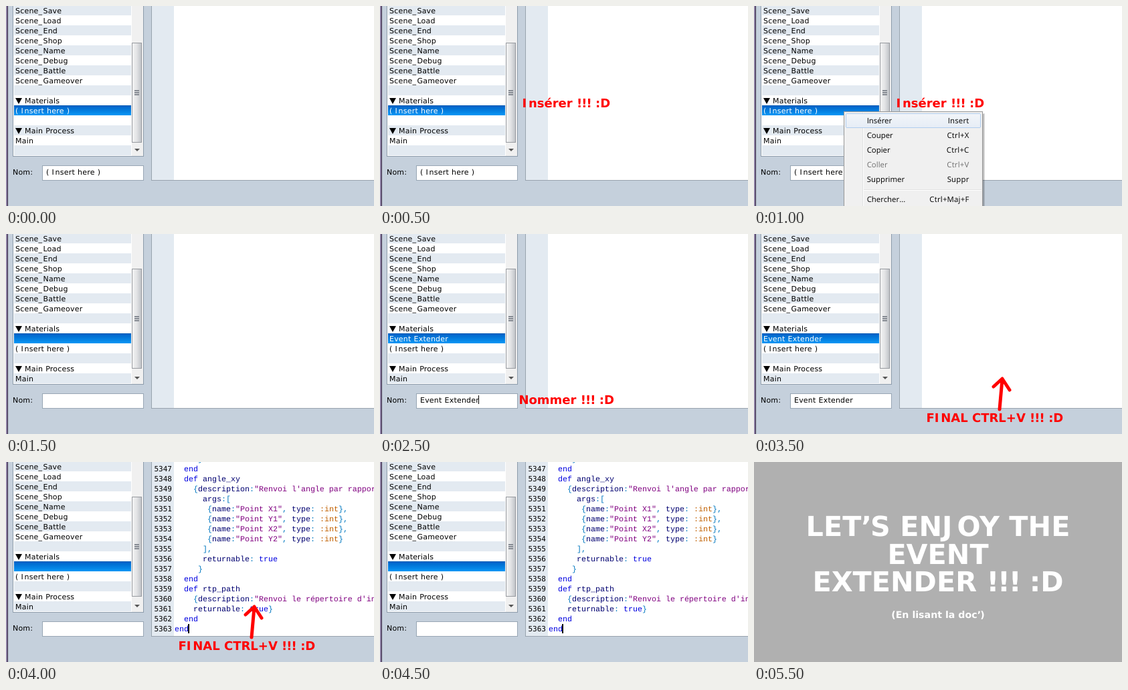
Write an HTML page that moves like this. It is 550 px wide and 300 px high and loops after 6.5 s.

```html
<!DOCTYPE html>
<html lang="fr">
<head>
<meta charset="utf-8">
<style>
  html, body { margin: 0; width: 100%; height: 100%; overflow: hidden; background: #c5d0dc; }
  svg { display: block; }
  rect { shape-rendering: crispEdges; }
  text { white-space: pre; text-rendering: geometricPrecision; font-kerning: none; }
  .ui { font: 11px "DejaVu Sans", sans-serif; letter-spacing: .2px; word-spacing: .4px; }
  .menu { font: 11.4px "Open Sans", sans-serif; }
  .key { text-anchor: end; letter-spacing: .2px; }
  .note { font: bold 18px "DejaVu Sans", sans-serif; fill: #f00; }
  .code { font: 11.667px "Liberation Mono", monospace; }
  .num { font: 11px "DejaVu Sans Mono", monospace; }
  .end { font: bold 41.33px "DejaVu Sans", sans-serif; fill: #fff; text-anchor: middle; }
</style>
</head>
<body>
<svg id="stage" width="550" height="300" viewBox="0 0 550 300"></svg>
<script>
const LOOP = 6500;
const CUTS = [0, 500, 1000, 1500, 2000, 2500, 3000, 3500, 4000, 4500, 5500];
const stage = document.getElementById('stage');

const rect = (x, y, w, h, fill, extra = '') =>
  `<rect x="${x}" y="${y}" width="${w}" height="${h}" fill="${fill}" ${extra}/>`;
const box = (x, y, w, h, fill, stroke, extra = '') =>
  rect(x + .5, y + .5, w - 1, h - 1, fill, `stroke="${stroke}" ${extra}`);
const text = (x, y, str, cls, extra = '') =>
  `<text x="${x}" y="${y}" class="${cls}" ${extra}>${str}</text>`;

// Extra tracking, in em, after the letters that need it
const TRACKING = { I: .16, J: .17, '!': -.054, '’': -.05, _: .13 };
const tracked = str => str.replace(/[IJ!’_]/g,
  c => `<tspan style="letter-spacing:${TRACKING[c]}em">${c}</tspan>`);
const label = (x, y, str, cls, extra) => text(x, y, tracked(str), cls, extra);

const DEFS = `<defs>
  <linearGradient id="sel" x2="0" y2="1"><stop stop-color="#0063c8"/><stop offset="1" stop-color="#0897f5"/></linearGradient>
  <linearGradient id="thumb"><stop stop-color="#f5f5f5"/><stop offset=".5" stop-color="#e2e3e5"/><stop offset="1" stop-color="#bfc2c7"/></linearGradient>
  <linearGradient id="hover" x2="0" y2="1"><stop stop-color="#f2f5f9"/><stop offset="1" stop-color="#e6edf6"/></linearGradient>
</defs>`;

function list(name, inserted) {
  const scenes = ['Save', 'Load', 'End', 'Shop', 'Name', 'Debug', 'Battle', 'Gameover'];
  const rows = [...scenes.map(s => 'Scene_' + s), '', '▼Materials', name,
    ...(inserted ? ['( Insert here )'] : []), '', '▼Main Process', 'Main'];
  let out = box(10, -2, 196, 228, '#fff', '#8d9cab');
  for (let i = 0; i < 15; i++) {
    const y = i * 15, row = rows[i] || '', selected = i === 10;
    if (selected) out += rect(12, y - 1, 175, 15, '#0058b4') + rect(12, y, 175, 14, 'url(#sel)');
    else if (i % 2 === 0) out += rect(12, y - 1, 175, 15, '#e3eaf1');
    if (row[0] === '▼') {
      out += `<polygon points="14,${y + 3} 24,${y + 3} 19,${y + 12}"/>` + label(28, y + 11, row.slice(1), 'ui');
    } else {
      out += label(14, y + 11, row, 'ui', selected ? 'fill="#fff"' : '');
    }
  }
  const top = inserted ? 52 : 55;
  out += rect(188, 0, 17, 225, '#f0f0f0') +
    box(188, top, 15, 150, 'url(#thumb)', '#979a9f', 'rx="1"') +
    '<polygon points="192,214 200,214 196,218" fill="#555"/>';
  for (let i = 0; i < 3; i++) out += rect(192, top + 71 + i * 3, 7, 2, '#858a92');
  return out;
}

const CODE = `     }
  end
  def angle_xy
    {description:"Renvoi l'angle par rapport à deux points",
      args:[
       {name:"Point X1", type: :int},
       {name:"Point Y1", type: :int},
       {name:"Point X2", type: :int},
       {name:"Point Y2", type: :int}
      ],
      returnable: true
     }
  end
  def rtp_path
    {description:"Renvoi le répertoire d'installation",
    returnable: true}
  end
end`.split('\n');

function tokenColor(token) {
  if (token[0] === '"') return '#800080';
  if (/^:\w/.test(token)) return '#c06000';
  if (/^(def|end|true)$/.test(token)) return '#0000e0';
  return /^\w/.test(token) ? '#000070' : '#0078c0';
}

const highlight = line => line.replace(/"[^"]*"|:\w+|\w+|[^\w\s]/g,
  token => `<tspan fill="${tokenColor(token)}">${token}</tspan>`);

const code = () => CODE.map((line, i) =>
  text(221.5, i * 15 - 1, 5346 + i, 'num') + text(252, i * 15 - 1, highlight(line), 'code')
).join('') + rect(272, 243, 2, 14, '#000');

function menu() {
  const items = [['Insérer', 'Insert', 172], ['Couper', 'Ctrl+X', 194], ['Copier', 'Ctrl+C', 216],
    ['Coller', 'Ctrl+V', 238], ['Supprimer', 'Suppr', 260], ['Chercher...', 'Ctrl+Maj+F', 290]];
  let out = rect(138, 162, 206, 140, '#000', 'opacity=".15"') + rect(138, 161, 207, 140, '#000', 'opacity=".12"') +
    box(134, 158, 208, 160, '#f0f0f0', '#979797') +
    rect(162, 160, 1, 140, '#e0e1e1') + rect(163, 160, 1, 140, '#fff') +
    rect(164, 275, 176, 1, '#e0e0e0') + rect(164, 276, 176, 1, '#fff') +
    box(137, 161, 202, 22, 'url(#hover)', '#b0cdee', 'rx="2"');
  for (const [name, key, y] of items) {
    const fill = name === 'Coller' ? 'fill="#707070"' : '';
    out += text(168.7, y + 4, name, 'menu', fill) + text(321.5, y + 4, key, 'menu key', fill);
  }
  return out;
}

const arrow = () =>
  '<path d="M367 263L371 218M358 229L371 217L382 234" fill="none" stroke="#f00" stroke-width="5" stroke-linecap="round" stroke-linejoin="round"/>';

function editor(step) {
  const inserted = step >= 3, pasted = step >= 8;
  const name = !inserted ? '( Insert here )' : step >= 5 && !pasted ? 'Event Extender' : '';
  let out = rect(0, 0, 550, 300, '#c5d0dc') +
    rect(0, 0, 2, 300, '#8c7fa2') + rect(2, 0, 1, 300, '#352742') +
    list(name, inserted) +
    text(10, 253, 'Nom:', 'ui') + box(54, 239, 152, 23, '#fff', '#98a6b4') + label(60, 253, name, 'ui') +
    box(217, -2, 340, 264, '#fff', '#98a3ae') + rect(218, 0, 33, 261, '#e3eaf1');
  if (pasted) out += code();
  if (step === 2) out += menu();
  if (step === 1 || step === 2) out += label(212.4, 151.8, 'Insérer !!! :D', 'note');
  if (step === 4 || step === 5) out += label(207.4, 254.8, 'Nommer !!! :D', 'note');
  if (step === 5) out += rect(147, 242, 1, 13, '#000');
  if (step === 7 || step === 8) out += arrow() + label(257.4, 281.8, 'FINAL CTRL+V !!! :D', 'note');
  return out;
}

const ending = () => rect(0, 0, 550, 300, '#b0b0b0') +
  label(275, 110.5, 'LET’S ENJOY THE', 'end') +
  label(275, 152.5, 'EVENT', 'end') +
  label(275, 194, 'EXTENDER !!! :D', 'end') +
  label(275, 234, '(En lisant la doc’)', 'end', 'style="font-size:14.2px"');

let shown = -1;
function draw() {
  const time = performance.now() % LOOP;
  const step = CUTS.findLastIndex(cut => time >= cut);
  if (step !== shown) {
    stage.innerHTML = DEFS + (step === 10 ? ending() : editor(step));
    shown = step;
  }
  requestAnimationFrame(draw);
}
draw();
</script>
</body>
</html>
```
